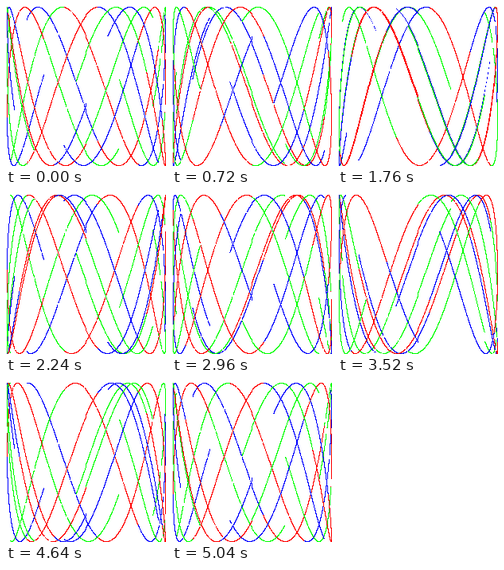
Recreate the animation shown at these times as an HTML page with a canvas. Size 201 by 201 pixels, loop 5120 ms.

```html
<!DOCTYPE html>
<html>
<head>
<meta charset="utf-8">
<title>Lissajous</title>
<style>
  html, body { margin: 0; width: 100%; height: 100%; overflow: hidden; background: #fff; }
  canvas { display: block; image-rendering: pixelated; }
</style>
</head>
<body>
<canvas id="stage" width="201" height="201"></canvas>
<script>
const SIZE = 100, WIDTH = 2 * SIZE + 1;
const CYCLES = 5, RES = 0.001, FREQ = 2.893;
const STEPS = 64, DELAY = 80, PHASE_STEP = 0.1;
const PALETTE = [0xffffffff, 0xff00ff00, 0xff0000ff, 0xffff0000]; // ABGR: white, green, red, blue

const ctx = document.getElementById('stage').getContext('2d');
const image = ctx.createImageData(WIDTH, WIDTH);
const pixels = new Uint32Array(image.data.buffer);

// Rounds toward zero after adding a half, so the curve spans 1 to 200
const toPixel = v => SIZE + Math.trunc(v * SIZE + 0.5);

function draw(phase) {
  pixels.fill(PALETTE[0]);
  for (let t = 0; t < CYCLES * 2 * Math.PI; t += RES) {
    const x = toPixel(Math.sin(t));
    const y = toPixel(Math.sin(t * FREQ + phase));
    pixels[y * WIDTH + x] = PALETTE[Math.floor(t) % 4];
  }
  ctx.putImageData(image, 0, 0);
}

let shown = 0;
const start = performance.now();

function tick() {
  const step = Math.floor((performance.now() - start) / DELAY) % STEPS;
  if (step !== shown) draw((shown = step) * PHASE_STEP);
  requestAnimationFrame(tick);
}

draw(0);
requestAnimationFrame(tick);
</script>
</body>
</html>
```
